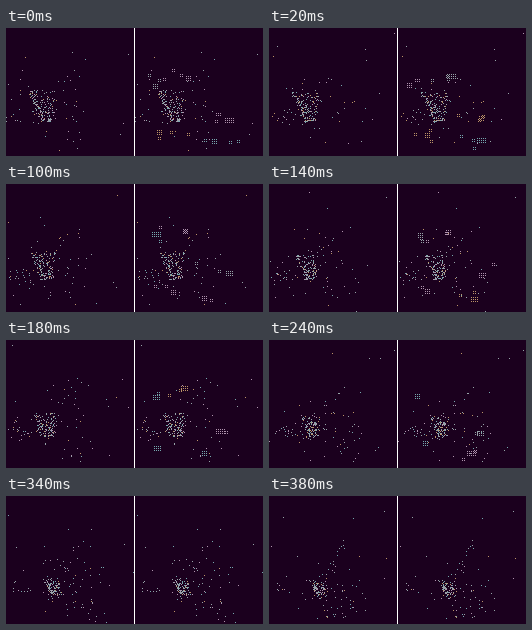
A matplotlib script that plays this animation: 257 px wide and 128 px high, repeating every 0.4 s.

```python
import numpy as np
import matplotlib.pyplot as plt
from matplotlib.animation import FuncAnimation

SIZE, WIDTH = 128, 257
FRAMES, STEP = 20, 20
DPI = 64  # divides the stage size exactly

BACK = (27, 0, 30)
PALETTE = np.array([(150, 164, 168), (176, 148, 174),
                    (118, 168, 174), (188, 148, 104)])
SHARES = [0.45, 0.2, 0.2, 0.15]

# Places on the right where coarse lattice noise gathers
HOT_SPOTS = [(18, 53), (45, 48), (83, 89), (27, 106), (76, 112)]


def mix(a, b, t):
    return a + (b - a) * t


def cloud(rng, n, center, spread):
    return rng.normal(center, spread, (int(n), 2))


def stroke(rng, n, start, end, spread):
    t = rng.random((int(n), 1))
    line = mix(np.array(start), np.array(end), t)
    return line + rng.normal(0, spread, line.shape)


def circle(rng, n, x, y, r):
    a = rng.uniform(0, 2 * np.pi, int(n))
    pts = np.column_stack((x + r * np.cos(a), y + r * np.sin(a)))
    return pts + rng.normal(0, 0.6, pts.shape)


def wedge(rng, n, x, y, width, height):
    """Points in a block that narrows towards its foot."""
    u, v = rng.uniform(-0.5, 0.5, (2, int(n)))
    return np.column_stack((x + u * width * (0.8 - 0.6 * v) + 5 * v,
                            y + v * height))


def events(t, rng):
    x, y = mix(38, 50, t * t), mix(78, 92, t)
    width, height = mix(26, 15, t), mix(31, 15, t)
    top, foot = y - height / 2, y + height / 2
    return np.vstack([
        wedge(rng, mix(95, 35, t), x, y, width, height),
        stroke(rng, mix(24, 4, t), (x - width / 2, top), (x, foot), 0.9),
        stroke(rng, mix(14, 2, t), (x - 4, foot), (x + 8, foot - 2), 0.8),
        cloud(rng, mix(20, 28, t), (x, y + 2), 6),
        circle(rng, mix(4, 22, t), x, y + 1, 5),
        cloud(rng, 7 + 13 * np.sin(np.pi * t), (14, 92), (7, 3.5)),
        cloud(rng, 38, (x + 10, y - 2), (21, 17)),
        stroke(rng, 3 + 10 * t * t, (78, 42), (x + 5, top), 2),
        cloud(rng, 4 + 16 * t * t, (75, 113), (13, 8)),
        rng.uniform((0, 5), SIZE, (10, 2)),
    ])


def lattice(t, rng):
    """Patches of dots two pixels apart, dying out over the loop."""
    strength = max(0, 1 - t / 0.8)
    for x, y in HOT_SPOTS:
        hue = rng.integers(len(PALETTE))
        for k in range(rng.binomial(4, strength ** 0.7)):
            cols, rows = (rng.integers(3, 6), 3) if k == 0 else (2, 2)
            cx, cy = rng.normal((x, y), (5, 2.5) if k < 2 else (14, 5))
            yield from ((int(cx) + 2 * c, int(cy) + 2 * r, hue)
                        for c in range(cols) for r in range(rows))


def picture(i):
    t = i / (FRAMES - 1)
    rng = np.random.default_rng(70 + i)
    left = np.full((SIZE, SIZE, 3), BACK, np.uint8)
    pts = np.floor(events(t, rng)).astype(int)
    pts = pts[((pts >= 0) & (pts < SIZE)).all(axis=1)]
    hues = rng.choice(len(PALETTE), len(pts), p=SHARES)
    left[pts[:, 1], pts[:, 0]] = PALETTE[hues]

    right = left.copy()
    for x, y, hue in lattice(t, rng):
        if 0 <= x < SIZE and 0 <= y < SIZE:
            right[y, x] = PALETTE[hue]
    divider = np.full((SIZE, 1, 3), 255, np.uint8)
    return np.hstack([left, divider, right])


fig = plt.figure(figsize=(WIDTH / DPI, SIZE / DPI), dpi=DPI)
ax = fig.add_axes([0, 0, 1, 1])
ax.axis("off")
image = ax.imshow(picture(0), interpolation="nearest", aspect="auto")


def update(i):
    image.set_data(picture(i))
    return (image,)


anim = FuncAnimation(fig, update, frames=FRAMES, interval=STEP,
                     repeat=True, repeat_delay=0)
plt.show()
```
